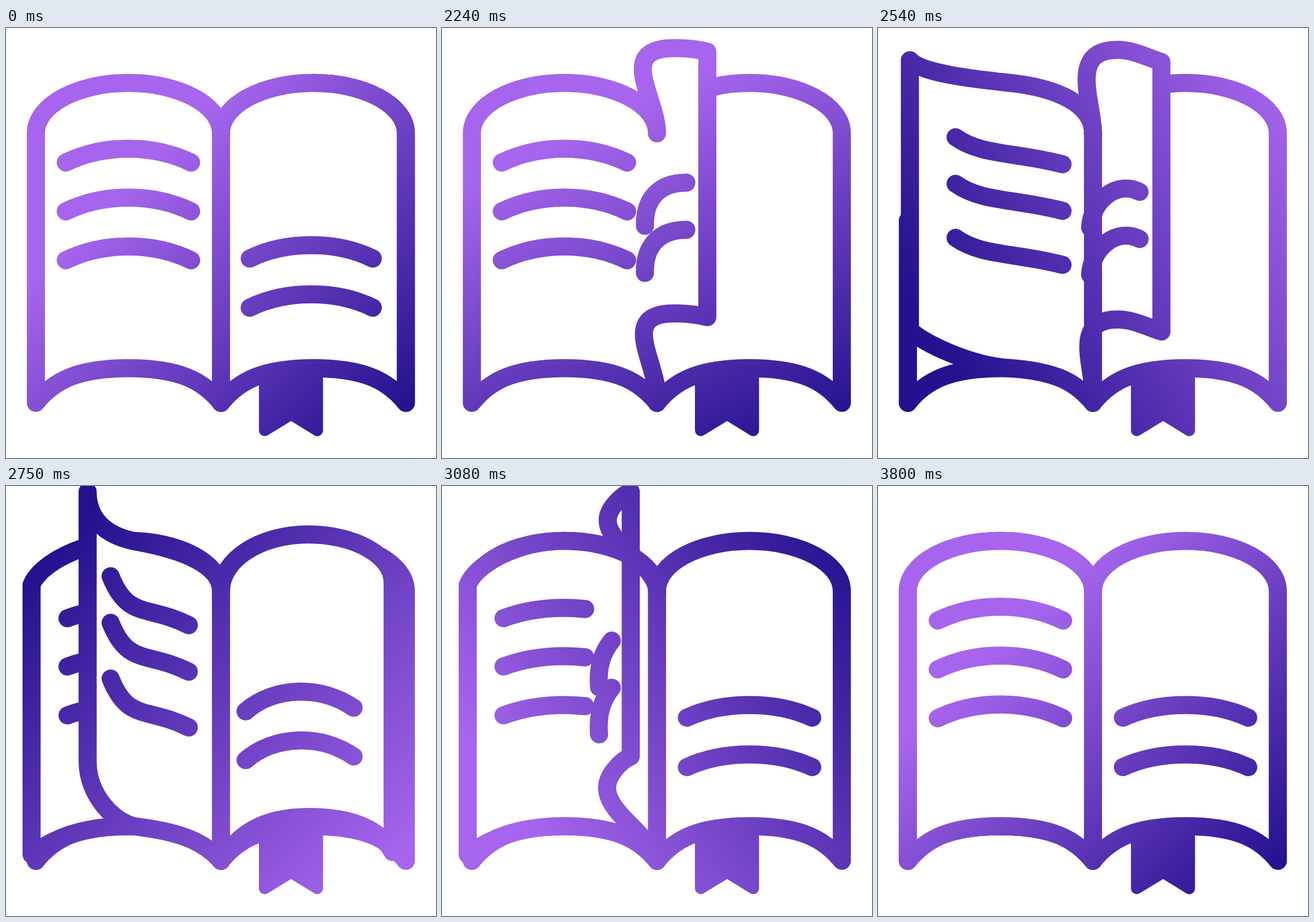
Animation, 748 px wide and 748 px high, one loop 3.83 s. Source, as an HTML page with a canvas:

```html
<!DOCTYPE html>
<html lang="en">
<head>
<meta charset="utf-8">
<title>Book</title>
<style>
  html, body { margin: 0; width: 100%; height: 100%; overflow: hidden; background: #fff; }
  canvas { display: block; width: 748px; height: 748px; }
</style>
</head>
<body>
<canvas id="stage" width="748" height="748"></canvas>
<script>
const ctx = document.getElementById('stage').getContext('2d');
const LOOP = 3830, HOLD = 2030, STEP = 30;
const SPINE = 374, TOP = 183, BOTTOM = 652, LEFT = 52, RIGHT = 695.5;

const clamp = (v, a = 0, b = 1) => Math.min(b, Math.max(a, v));
const lerp = (a, b, k) => a + (b - a) * k;

// Rows are [time, ...values]; returns the values mixed at time u.
function sample(rows, u) {
  if (u <= rows[0][0]) return rows[0].slice(1);
  for (let i = 1; i < rows.length; i++) {
    const a = rows[i - 1], b = rows[i];
    if (u < b[0]) {
      const k = (u - a[0]) / (b[0] - a[0]);
      return a.slice(1).map((v, j) => lerp(v, b[j + 1], k));
    }
  }
  return rows[rows.length - 1].slice(1);
}

// Page top: two cubics from the spine over the crest (ax, ay) to the corner (tx, ty).
const arch = (ax, ay, tx, ty, flat) => [
  SPINE, lerp(ay, TOP, .44), lerp(ax, SPINE, .55), ay, ax, ay,
  lerp(ax, tx, .55), ay, tx, lerp(ay, ty, .44), tx, ty, flat];

const REST_LEFT = arch(213, 95.5, LEFT, TOP, .69);
const REST_RIGHT = arch(535, 95.5, RIGHT, TOP, .69);

const POSES = [
  [0, ...REST_RIGHT],
  [45, ...arch(525, 83, 670, 166, .78)],
  [205, 374, 130, 330, 38, 417, 38, 445, 38, 470, 52, 493, 59, 1],
  [230, 374, 120, 300, 33, 408, 35, 430, 35, 448, 38, 461.5, 41, 1.05],
  [308, 374, 130, 250, 90, 300, 32, 308, 22, 318, 14, 328, 10, 1.05],
  [415, 374, 138, 310, 112, 228, 97, 190, 90, 142, 70, 142, 10, .69],
  [530, 374, 134, 315, 104, 225, 95, 160, 88, 75, 78, 55.5, 56, .69],
  [600, ...arch(215, 95.5, 31, 135, .69)],
  [740, 374, 134, 302, 95.5, 213, 95.5, 130, 95.5, 58, 137, 44.5, 172, .69],
  [891, ...REST_LEFT]
];

// Text lines: one cubic each.
const FRONT = [
  [0, 424, 401, 487, 370, 575, 370, 638, 401],
  [45, 416, 391, 465, 346, 545, 344, 601, 384],
  [205, 369, 347, 372, 300, 415, 265, 455, 285],
  [230, 353, 344, 352, 300, 375, 269, 425, 269],
  [308, 273, 350, 270, 315, 278, 290, 295, 269],
  [345, 215, 350, 222, 320, 232, 290, 245, 269]
];
const FLIP = 345;

// The last two values are the drops to the second and third line.
const BACK = [
  [FLIP, 250, 150, 262, 200, 280, 215, 322, 240, 81, 176],
  [415, 182, 157, 212, 232, 245, 206, 318, 242, 81, 178],
  [530, 135, 190, 180, 222, 235, 215, 321, 237, 81, 175],
  [740, 107, 230, 175, 206, 250, 205, 322, 234, 84, 169],
  [891, 104, 234, 170, 202, 256, 202, 322, 234, 85, 170]
];
const SHORT = [107, 230, 150, 214, 200, 209, 249, 214, 84, 169];
const BASE_LINE = [426, 403, 489, 373.5, 581, 373.5, 644, 403];

const PAGES = [
  { start: 2010, rate: 1 },
  { start: 2335, rate: 1, shorten: true },
  { start: 2700, rate: .81 }
];

// Time, gradient middle along its direction, half length.
const SHADE = [
  [2030, 125, 310], [2240, 95, 325], [2540, -50, 370],
  [2750, -10, 400], [3080, 60, 365], [3800, 125, 310]
];

function ease(x) {
  const bez = (a, b, s) => 3 * (1 - s) * (1 - s) * s * a + 3 * (1 - s) * s * s * b + s ** 3;
  let lo = 0, hi = 1;
  for (let i = 0; i < 24; i++) {
    const s = (lo + hi) / 2;
    if (bez(.3, .45, s) < x) lo = s; else hi = s;
  }
  return bez(0, 1, lo);
}

function gradient(t) {
  const angle = (45 + 360 * ease(clamp((t - HOLD) / 1770))) * Math.PI / 180;
  const [mid, half] = sample(SHADE, t);
  const at = d => [374 + d * Math.cos(angle), 374 + d * Math.sin(angle)];
  const g = ctx.createLinearGradient(...at(mid - half), ...at(mid + half));
  g.addColorStop(0, '#a665ec');
  g.addColorStop(1, '#24118d');
  return g;
}

// The lower edge follows the upper one, flattened near rest.
function lowerEdge(p) {
  const flat = p[12], rest = clamp(1 - (TOP - p[11]) / 60);
  const side = lerp(Math.max(1, flat), .78, rest);
  const y = (v, k) => BOTTOM + (v - TOP) * k;
  return [
    lerp(SPINE, p[4], .19), y(p[1], lerp(flat, .78, rest)), p[2], y(p[3], flat), p[4], y(p[5], flat),
    p[6], y(p[7], flat), lerp(p[8], p[4], .19 * rest), y(p[9], side), p[10], y(p[11], Math.max(1, flat))];
}

function tracePage(p) {
  const q = lowerEdge(p);
  ctx.beginPath();
  ctx.moveTo(SPINE, TOP);
  ctx.bezierCurveTo(...p.slice(0, 6));
  ctx.bezierCurveTo(...p.slice(6, 12));
  ctx.lineTo(q[10], q[11]);
  ctx.bezierCurveTo(q[8], q[9], q[6], q[7], q[4], q[5]);
  ctx.bezierCurveTo(q[2], q[3], q[0], q[1], SPINE, BOTTOM);
}

function drawPage(p) {
  tracePage(p);
  ctx.fillStyle = '#fff';
  ctx.fill();
  ctx.stroke();
}

function drawLines(c, drops) {
  for (const d of drops) {
    ctx.beginPath();
    ctx.moveTo(c[0], c[1] + d);
    ctx.bezierCurveTo(c[2], c[3] + d, c[4], c[5] + d, c[6], c[7] + d);
    ctx.stroke();
  }
}

const drawBack = c => drawLines(c, [0, c[8], c[9]]);

function segment(x1, y1, x2, y2) {
  ctx.beginPath();
  ctx.moveTo(x1, y1);
  ctx.lineTo(x2, y2);
  ctx.stroke();
}

function drawBase(t) {
  drawPage(REST_RIGHT);
  if (t < 2535) {
    drawPage(REST_LEFT);
    drawBack(sample(BACK, 891));
  } else {
    const q = lowerEdge(REST_LEFT);
    segment(LEFT, 335, LEFT, BOTTOM);
    ctx.beginPath();
    ctx.moveTo(LEFT, BOTTOM);
    ctx.bezierCurveTo(q[8], q[9], q[6], q[7], q[4], q[5]);
    ctx.bezierCurveTo(q[2], q[3], q[0], q[1], SPINE, BOTTOM);
    ctx.stroke();
  }
  if (t >= PAGES[2].start) drawLines(BASE_LINE, [0, 86]);
}

function drawTurning(page, t) {
  const u = (t - page.start) * page.rate;
  drawPage(sample(POSES, u));
  if (u < FLIP) {
    drawLines(sample(FRONT, u), [0, 85.5 - 3.5 * clamp(u / 205)]);
  } else {
    const k = page.shorten ? clamp((u - 660) / 80) : 0;
    drawBack(sample(BACK, u).map((v, i) => lerp(v, SHORT[i], k)));
  }
}

function drawBookmark(paint) {
  ctx.beginPath();
  ctx.moveTo(450, 607);
  ctx.lineTo(450, 700);
  ctx.lineTo(496, 672);
  ctx.lineTo(541.5, 700);
  ctx.lineTo(541.5, 607);
  ctx.closePath();
  ctx.lineWidth = 20;
  ctx.fillStyle = paint;
  ctx.fill();
  ctx.stroke();
}

function draw(t) {
  const paint = gradient(t);
  ctx.fillStyle = '#fff';
  ctx.fillRect(0, 0, 748, 748);
  ctx.strokeStyle = paint;
  ctx.lineWidth = 31.5;
  ctx.lineCap = ctx.lineJoin = 'round';
  drawBase(t);
  PAGES.forEach((page, i) => {
    if (i === 0 || t >= page.start) drawTurning(page, t);
  });
  // The spine is hidden while the first page stands open.
  if (t < 2120 || t > 2360) segment(SPINE, TOP, SPINE, BOTTOM);
  drawBookmark(paint);
}

const origin = performance.now();
function tick() {
  const t = (performance.now() - origin) % LOOP;
  draw(t < HOLD ? 0 : HOLD + Math.floor((t - HOLD) / STEP) * STEP);
  requestAnimationFrame(tick);
}
tick();
</script>
</body>
</html>
```
